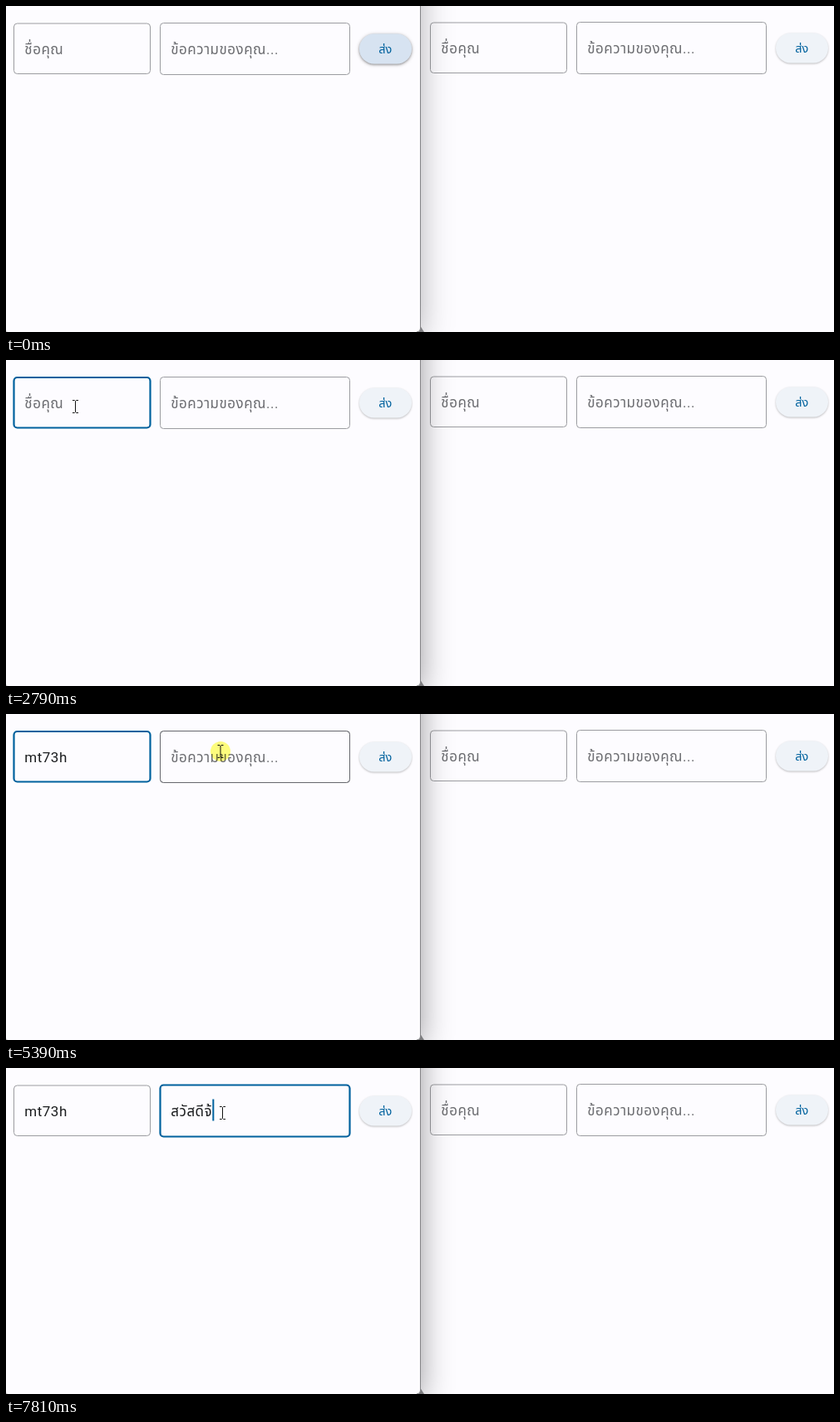
These frames come from a looping animation (996 px wide and 392 px high, 8 s). An HTML page:

```html
<!DOCTYPE html>
<html lang="th">
<head>
<meta charset="utf-8">
<style>
  html, body { margin: 0; width: 100%; height: 100%; overflow: hidden; background: #fdfcff; }
  svg { display: block; width: 996px; height: 392px; }
  text {
    font: 17px Roboto, "Noto Sans Thai Looped", "Noto Sans Thai", "Noto Sans", sans-serif;
    letter-spacing: .5px; fill: #1a1c1e; white-space: pre;
  }
  rect { fill: none; }
  .hint { fill: #6c6d71; }
  .line { stroke: #9b9ca0; }
  .hover { stroke: #505257; }
  .focus { stroke: #00629e; }
  .caret { fill: #00629e; }
  .button { fill: #eff3f8; filter: drop-shadow(0 1px 1px rgba(0, 0, 0, .25)); }
  .buttonHover { fill: #d7e3f1; filter: drop-shadow(0 1px 2px rgba(0, 0, 0, .3)); }
  .label { font-size: 14.5px; font-weight: 500; letter-spacing: .1px; fill: #00629e; text-anchor: middle; }
  #window { fill: #fdfcff; filter: drop-shadow(0 8px 19px rgba(0, 0, 0, var(--shade))); }
  #halo { fill: #ffff7d; mix-blend-mode: multiply; }
</style>
</head>
<body>
<svg viewBox="0 0 996 392">
  <g id="right" transform="translate(501 -1)"></g>
  <path d="M493 392L498.500 385L503 392z" fill="#8f8f92"/>
  <path id="window" d="M-60 -60H498.500V387q0 5 -5 5H3q-3 0 -3 -3H-60z"/>
  <path d="M498.500 0V387q0 4.500 -4.500 5" fill="none" stroke="#858588"/>
  <g id="left"></g>
  <g id="pointer">
    <circle id="halo" r="12"/>
    <path id="beam" d="M-3.500 -7.500H-1L0 -6.500L1 -7.500H3.500M0 -6.500V6.500M-3.500 7.500H-1L0 6.500L1 7.500H3.500"
      fill="none" stroke="#111"/>
    <path id="arrow" d="M0 0V16l4 -3.500 2.500 6 2.500 -1 -2.500 -6h5z" fill="#fff" stroke="#111"/>
  </g>
</svg>
<script>
const LOOP = 8000, BLINK = 490;
const $ = id => document.getElementById(id);

const fields = {
  name: {
    x: 9.5, y: 21, w: 164, h: 60.5, hint: 'ชื่อคุณ', value: 'mt73h',
    focus: 840, blur: 5460, keys: [3060, 3530, 4170, 4370, 4700], fade: 200
  },
  message: {
    x: 185.5, y: 20.5, w: 228, h: 62, hint: 'ข้อความของคุณ...', value: 'สวัสดีจ้',
    focus: 5500, blur: Infinity, keys: [6330, 6470, 6740, 6890, 7070, 7280, 7610, 7810], fade: 150
  }
};

// [time, x, y]; the pointer eases from stop to stop
const stops = [[120, 688, 377], [750, 75, 43], [950, 83.5, 56], [4900, 83.5, 56], [5390, 258, 45], [5600, 260.5, 54]];

function fieldMarkup(id, { x, y, w, h, hint }) {
  const box = cls => `<rect class="${cls}" x="${x}" y="${y}" width="${w}" height="${h}" rx="4"/>`;
  return `<g class="${id}">${box('line')}${box('hover')}${box('focus')}
    <text class="hint" x="${x + 12.8}" y="57.5">${hint}</text>
    <text class="value" x="${x + 12.8}" y="58"></text>
    <rect class="caret" y="37.5" width="2" height="26"/></g>`;
}

function buttonMarkup() {
  const pill = cls => `<rect class="${cls}" x="425" y="33.5" width="63" height="36" rx="18"/>`;
  return pill('button') + pill('buttonHover') + '<text class="label" x="456.3" y="57">ส่ง</text>';
}

for (const side of ['left', 'right']) {
  $(side).innerHTML = Object.entries(fields).map(([id, f]) => fieldMarkup(id, f)).join('') + buttonMarkup();
  $(side).querySelectorAll('.hover, .focus, .caret, .buttonHover').forEach(e => e.style.opacity = 0);
}

const part = selector => $('left').querySelector(selector);
const ramp = (t, start, length) => Math.min(1, Math.max(0, (t - start) / length));
const smooth = p => p * p * (3 - 2 * p);

function pointerAt(t) {
  let i = 0;
  while (i < stops.length - 2 && t >= stops[i + 1][0]) i++;
  const [t0, x0, y0] = stops[i], [t1, x1, y1] = stops[i + 1];
  const p = smooth(ramp(t, t0, t1 - t0));
  return [x0 + (x1 - x0) * p, y0 + (y1 - y0) * p];
}

const inside = ([x, y], f) => x > f.x && x < f.x + f.w && y > f.y && y < f.y + f.h;

function drawField(id, t, pointer) {
  const f = fields[id], get = cls => part(`.${id} .${cls}`);
  const typed = f.keys.filter(k => k <= t).length;
  const active = t >= f.focus && t < f.blur;
  const focus = smooth(ramp(t, f.focus, 200)) * (1 - ramp(t, f.blur, 150));

  get('focus').style.opacity = focus;
  get('focus').style.strokeWidth = 1 + 1.2 * focus;
  get('hover').style.opacity = t > 120 && inside(pointer, f) ? .7 : 0;
  get('hint').style.opacity = 1 - ramp(t, f.keys[0], f.fade);

  const value = get('value');
  value.textContent = f.value.slice(0, typed);
  const since = t - (typed ? f.keys[typed - 1] : f.focus);
  get('caret').style.opacity = active && since % (2 * BLINK) < BLINK ? 1 : 0;
  get('caret').setAttribute('x', f.x + 13 + (typed ? value.getComputedTextLength() : 0));
}

function draw() {
  const t = performance.now() % LOOP;
  const pointer = pointerAt(t);
  for (const id in fields) drawField(id, t, pointer);

  part('.buttonHover').style.opacity = 1 - ramp(t, 120, 200);
  $('window').style.setProperty('--shade', .3 + .1 * ramp(t, 350, 300));

  const overText = Object.values(fields).some(f => inside(pointer, f));
  $('pointer').style.display = t < 120 ? 'none' : '';
  $('pointer').setAttribute('transform', `translate(${pointer})`);
  $('beam').style.opacity = overText ? 1 : 0;
  $('arrow').style.opacity = overText ? 0 : 1;
  $('halo').style.opacity = t < 4900 ? 1 - ramp(t, 950, 150) : 1 - ramp(t, 5530, 120);
  requestAnimationFrame(draw);
}
draw();
</script>
</body>
</html>
```
